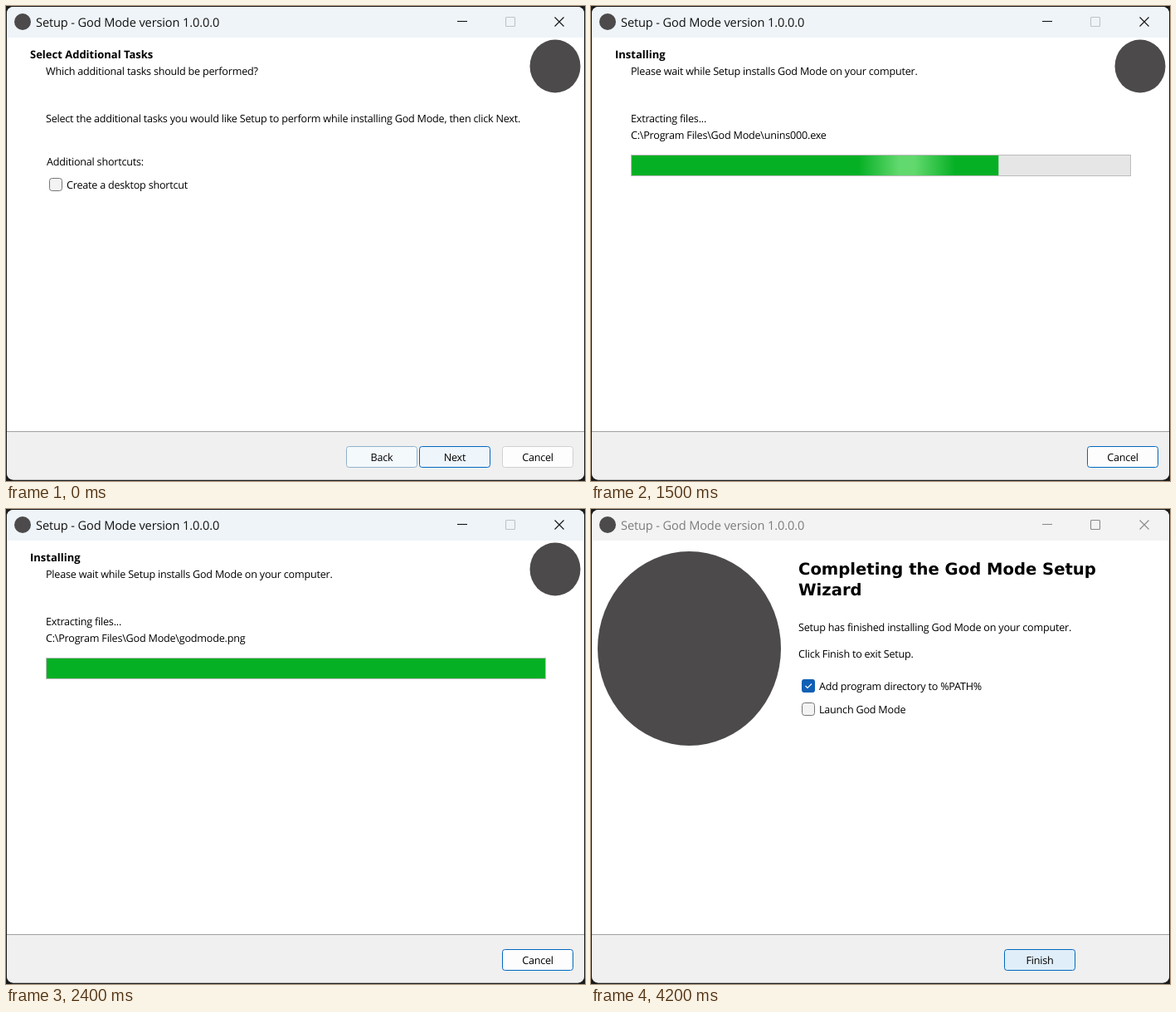
These frames come from a looping animation (698 px wide and 572 px high, 4300 ms). An HTML page:

```html
<!DOCTYPE html>
<html lang="en">
<head>
<meta charset="utf-8">
<title>Setup</title>
<style>
html, body { margin: 0; width: 100%; height: 100%; overflow: hidden; background: #1b1b1b; }
svg { display: block; width: 698px; height: 572px; }
text { font: 12.6px "Open Sans", "Noto Sans", sans-serif; letter-spacing: -.22px; fill: #000; text-rendering: geometricPrecision; }
.head { font-size: 13px; font-weight: 700; letter-spacing: 0; }
.big { font: 700 19.6px "DejaVu Sans", sans-serif; letter-spacing: 0; }
.caption { font-size: 14.6px; letter-spacing: -.13px; }
.mid { text-anchor: middle; }
.logo { fill: #4c4a4b; }
.box { fill: #f3f3f3; stroke: #767676; }
.glyph { fill: none; stroke-width: 1.1; }
</style>
</head>
<body>
<svg viewBox="0 0 698 572">
  <defs>
    <clipPath id="win"><rect x="1" y="1" width="696" height="569.5" rx="8"/></clipPath>
    <clipPath id="fillClip"><rect id="clip" x="49" y="180" width="0" height="24"/></clipPath>
    <linearGradient id="glow">
      <stop offset="0" stop-color="#72e07a" stop-opacity="0"/>
      <stop offset=".42" stop-color="#72e07a" stop-opacity=".85"/>
      <stop offset=".58" stop-color="#72e07a" stop-opacity=".85"/>
      <stop offset="1" stop-color="#72e07a" stop-opacity="0"/>
    </linearGradient>
  </defs>
  <rect width="698" height="572" fill="#1b1b1b"/>
  <g clip-path="url(#win)">
    <rect width="698" height="572" fill="#fff"/>
    <rect id="bar" width="698" height="38"/>
    <rect y="512" width="698" height="60" fill="#f0f0f0"/>
    <rect y="512" width="698" height="1" fill="#a0a0a0"/>
  </g>
  <circle class="logo" cx="20" cy="19" r="10"/>
  <text id="caption" class="caption" x="36" y="25">Setup - God Mode version 1.0.0.0</text>
  <path id="min" class="glyph" d="M544 18.5h12"/>
  <rect id="max" class="glyph" x="602.5" y="13.5" width="11" height="11" rx="1"/>
  <path id="close" class="glyph" d="M661.5 13.5l11 11m0-11l-11 11"/>
  <ellipse id="badge" class="logo" cx="662" cy="72.5" rx="30.5" ry="32"/>

  <g id="tasks">
    <text class="head" x="29" y="63">Select Additional Tasks</text>
    <text x="48" y="83">Which additional tasks should be performed?</text>
    <text x="48" y="140">Select the additional tasks you would like Setup to perform while installing God Mode, then click Next.</text>
    <text x="49" y="192">Additional shortcuts:</text>
    <rect class="box" x="52.5" y="207.5" width="15" height="15" rx="3"/>
    <text x="73" y="220">Create a desktop shortcut</text>
  </g>

  <g id="install">
    <text class="head" x="29" y="63">Installing</text>
    <text x="48" y="83">Please wait while Setup installs God Mode on your computer.</text>
    <g id="status">
      <text x="48" y="140">Extracting files...</text>
      <text id="file" x="48" y="160"></text>
    </g>
    <rect x="48.5" y="179.5" width="602" height="25" fill="#e6e6e6" stroke="#bcbcbc"/>
    <g clip-path="url(#fillClip)">
      <rect x="49" y="180" width="601" height="24" fill="#06b025"/>
      <rect id="shine" y="180" width="116" height="24" fill="url(#glow)"/>
    </g>
  </g>

  <g id="finish">
    <ellipse class="logo" cx="118.5" cy="168" rx="110.5" ry="117"/>
    <text class="big" x="250" y="79">Completing the God Mode Setup</text>
    <text class="big" x="250" y="104">Wizard</text>
    <text x="250" y="147">Setup has finished installing God Mode on your computer.</text>
    <text x="250" y="179">Click Finish to exit Setup.</text>
    <rect x="254" y="205" width="16" height="16" rx="3" fill="#0f5fb5"/>
    <path d="M258.5 213l2.5 2.5 5-5" fill="none" stroke="#fff" stroke-width="1.1"/>
    <text x="275" y="218">Add program directory to %PATH%</text>
    <rect class="box" x="254.5" y="233.5" width="15" height="15" rx="3"/>
    <text x="275" y="246">Launch God Mode</text>
  </g>

  <g id="buttons"></g>
</svg>
<script>
const LOOP = 4300, INSTALL = 700, FINISH = 2800, BLUR = 4000;
const $ = id => document.getElementById(id);
const show = (id, on) => $(id).setAttribute('display', on ? 'inline' : 'none');
const attr = (id, name, value) => $(id).setAttribute(name, value);
const ramp = (t, a, b) => Math.min(1, Math.max(0, (t - a) / (b - a)));
const mix = (a, b, k) => `rgb(${a.map((v, i) => Math.round(v + (b[i] - v) * k))})`;

const WHITE = [253, 253, 253], HOVER = [224, 238, 249];
const GREY = [208, 208, 208], BLUE = [0, 103, 192];

function button(id, label, x) {
  $('buttons').insertAdjacentHTML('beforeend', `<g id="${id}">
    <rect id="${id}Face" x="${x + .5}" y="530.5" width="85" height="25" rx="3"/>
    <text class="mid" x="${x + 43}" y="548">${label}</text></g>`);
}
button('back', 'Back', 410);
button('next', 'Next', 498);
button('done', 'Finish', 498);
button('cancel', 'Cancel', 598);

function paint(id, hover, focus) {
  attr(id + 'Face', 'fill', mix(WHITE, HOVER, hover));
  attr(id + 'Face', 'stroke', mix(GREY, BLUE, focus));
}

// Fast at first, then nearly full, then complete
const progress = t => .734 * ramp(t, 800, 1500) + .248 * ramp(t, 1500, 1850) + .018 * ramp(t, 2200, 2400);

function draw(t) {
  const tasks = t < INSTALL, finish = t >= FINISH, blur = t >= BLUR;
  show('tasks', tasks);
  show('install', !tasks && !finish);
  show('finish', finish);
  show('badge', !finish);
  show('back', tasks);
  show('next', tasks);
  show('done', finish);
  show('cancel', !finish);

  const leave = 1 - ramp(t, 0, 200);
  paint('back', .3 * leave, .3 * leave);
  paint('next', .5 + .5 * ramp(t, 0, 200), 1);
  paint('cancel', 0, tasks ? 0 : 1);
  paint('done', ramp(t, 3200, 3600), 1);

  show('status', t >= 800);
  $('file').textContent = 'C:\\Program Files\\God Mode\\' + (t < 1700 ? 'unins000.exe' : 'godmode.png');
  attr('clip', 'width', 602 * progress(t));
  attr('shine', 'x', 322 + (t - 1500) * .7);

  attr('bar', 'fill', blur ? '#f3f3f3' : '#eff4f8');
  attr('caption', 'style', 'fill:' + (blur ? '#7c7c7c' : '#111'));
  attr('min', 'stroke', blur ? '#8a8a8a' : '#111');
  attr('max', 'stroke', blur ? '#8a8a8a' : '#c0c3c6');
  attr('close', 'stroke', blur ? '#8a8a8a' : finish ? '#c0c3c6' : '#111');
}

function tick() {
  draw(performance.now() % LOOP);
  requestAnimationFrame(tick);
}
tick();
</script>
</body>
</html>
```
